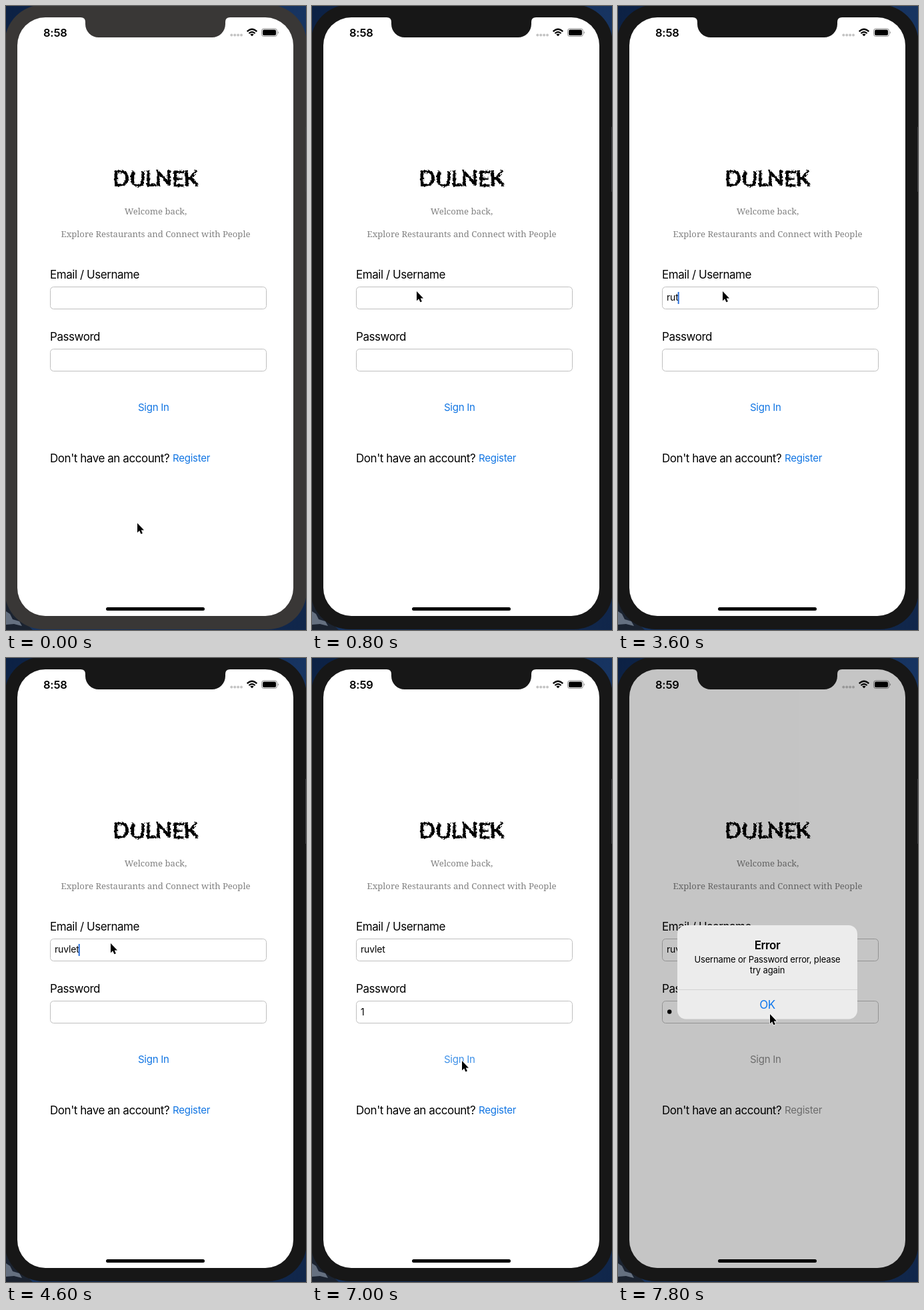
An HTML page that plays this animation: 450 px wide and 934 px high, repeating every 8 s.

```html
<!DOCTYPE html>
<html lang="en">
<head>
<meta charset="utf-8">
<title>Sign in</title>
<style>
html, body { margin: 0; width: 100%; height: 100%; overflow: hidden; background: #10264a; }
svg { display: block; width: 450px; height: 934px; }
text { font: 17px Inter, sans-serif; letter-spacing: -.45px; fill: #000; white-space: pre; }
.mid { text-anchor: middle; }
.clock { font-size: 16.5px; font-weight: 600; letter-spacing: -.2px; }
.logo { font: 700 33px Lato, sans-serif; letter-spacing: -1px; }
.tag { font: 13.1px "Noto Serif", serif; letter-spacing: 0; fill: #808080; }
.field { fill: #fff; stroke: #bfbfbf; }
.entry { font-size: 14px; letter-spacing: -.15px; }
.link { font-size: 15px; letter-spacing: -.25px; fill: #1175e3; }
.note { font-size: 13px; letter-spacing: -.15px; }
.bold { font-weight: 600; }
.ok { fill: #0f78ee; }

.bezel, #cursor, .link, .dim, #alert { animation: 8s step-end infinite; }
.bezel { fill: #171717; animation-name: activate; }
#cursor { animation-name: travel; }
.link { animation-name: fade; }
#sign { animation-name: press; }
.dim { animation-name: darken; }
#alert { transform-origin: 224px 470.5px; animation-name: pop; }

@keyframes activate { 0% { fill: #393736; } 7.5%, 100% { fill: #171717; } }
@keyframes travel {
  0% { transform: translate(197px, 774px); }
  2.5% { transform: translate(193px, 735px); }
  5% { transform: translate(172px, 530px); }
  7.5% { transform: translate(158px, 434px); }
  10% { transform: translate(157px, 427px); }
  60% { transform: translate(155px, 446px); }
  62.5% { transform: translate(149px, 505px); }
  65%, 72.5% { transform: translate(146px, 540px); }
  75% { transform: translate(153px, 547px); }
  77.5% { transform: translate(178px, 567px); }
  80% { transform: translate(208px, 592px); }
  82.5% { transform: translate(223px, 602px); }
  85%, 90% { transform: translate(225px, 603px); }
  92.5% { transform: translate(226px, 578px); }
  95% { transform: translate(228px, 541px); }
  97.5%, 100% { transform: translate(228px, 533px); }
}
@keyframes fade {
  0% { fill: #1175e3; }
  90% { fill: #748699; }
  92.5%, 100% { fill: #8c8c8c; }
}
@keyframes press {
  0% { fill: #1175e3; }
  87.5% { fill: #3f91e8; }
  90% { fill: #748699; }
  92.5%, 100% { fill: #8c8c8c; }
}
@keyframes darken { 0% { opacity: 0; } 90% { opacity: .204; } 92.5%, 100% { opacity: .231; } }
@keyframes pop {
  0% { opacity: 0; transform: scale(1.2); }
  90% { opacity: .84; transform: scale(1.03); }
  92.5%, 100% { opacity: 1; transform: none; }
}
</style>
</head>
<body>
<svg viewBox="0 0 450 934">
  <defs>
    <linearGradient id="sky" x2="1" y2="1">
      <stop offset="0" stop-color="#0c2144"/>
      <stop offset=".5" stop-color="#173461"/>
      <stop offset="1" stop-color="#10264a"/>
    </linearGradient>
    <filter id="rough" x="-5%" y="-20%" width="110%" height="140%">
      <feTurbulence type="fractalNoise" baseFrequency=".28" numOctaves="2" seed="4"/>
      <feDisplacementMap in="SourceGraphic" scale="5" xChannelSelector="R" yChannelSelector="G"/>
    </filter>
  </defs>

  <rect width="450" height="934" fill="url(#sky)"/>
  <path d="M0 884L8 896 24 918 40 934H0Z" fill="#1b2330"/>
  <path d="M0 906l6 4 4 8 10 3 4 7-12-3-12 1z" fill="#657080"/>
  <rect class="bezel" x="-2" y="-2" width="453" height="935" rx="58"/>
  <path d="M449.5 181V278" stroke="#3c3c3e"/>
  <rect x="17" y="17" width="414" height="896" rx="42" fill="#fff"/>

  <text class="clock" x="56" y="45.5" id="clock">8:58</text>
  <g fill="#c4c4c4">
    <circle cx="338.3" cy="43.5" r="2"/><circle cx="343.2" cy="43.5" r="2"/>
    <circle cx="348.1" cy="43.5" r="2"/><circle cx="353" cy="43.5" r="2"/>
  </g>
  <g fill="none" stroke="#000" stroke-width="2.3">
    <path d="M361.7 38.2Q369 31.2 376.3 38.2M364.4 41Q369 36.7 373.6 41"/>
    <path d="M366.3 42.4Q369 40.4 371.7 42.4L369 45.2Z" fill="#000" stroke="none"/>
  </g>
  <rect x="383.5" y="34" width="23" height="11.5" rx="3.2" fill="none" stroke="#8a8a8a"/>
  <rect x="385" y="35.5" width="20" height="8.5" rx="2"/>
  <path d="M408 37.7q2.2 2 0 4z" fill="#8a8a8a"/>

  <text class="logo mid" x="224.5" y="270" rotate="-2 3 0 -3 2 -2" filter="url(#rough)">DULNEK</text>
  <text class="tag mid" x="224.5" y="312">Welcome back,</text>
  <text class="tag mid" x="224.5" y="346">Explore Restaurants and Connect with People</text>

  <text x="66" y="408">Email / Username</text>
  <rect class="field" x="66.5" y="420.5" width="324" height="33" rx="5"/>
  <text class="entry" x="73" y="441" id="user"></text>
  <text x="66" y="501">Password</text>
  <rect class="field" x="66.5" y="513.5" width="324" height="33" rx="5"/>
  <text class="entry" x="73" y="534.5" id="pass"></text>
  <circle id="dot" cx="77.2" cy="529.5" r="3.2"/>
  <rect id="caret" width="2" height="18" fill="#2d72dc"/>

  <text class="link" id="sign" x="198" y="606">Sign In</text>
  <text x="66" y="683">Don't have an account?</text>
  <text class="link" x="250" y="682">Register</text>

  <rect class="dim" x="17" y="17" width="414" height="896" rx="42"/>
  <path class="bezel" d="M112 16V17q7 0 7 7v3a20 20 0 0 0 20 20h170a20 20 0 0 0 20-20v-3q0-7 7-7V16Z"/>
  <rect x="150" y="900" width="148" height="5" rx="2.5"/>

  <g id="alert">
    <rect x="89" y="400" width="270" height="140.5" rx="13" fill="#ececec"/>
    <path d="M89 496.5H359" stroke="#d2d2d2"/>
    <text class="mid bold" x="224" y="436">Error</text>
    <text class="note mid" x="224" y="456">Username or Password error, please</text>
    <text class="note mid" x="224" y="472">try again</text>
    <text class="ok mid" x="224" y="525">OK</text>
  </g>

  <g id="cursor">
    <path d="M0 0V14.2L3.2 11.3 5.4 16.3 7.9 15.2 5.7 10.4H10Z" stroke="#fff" stroke-width="1.6"
      stroke-linejoin="round" paint-order="stroke"/>
  </g>
</svg>
<script>
const $ = id => document.getElementById(id);
const LOOP = 8000;

// Each track lists [start ms, value].
const userTrack = [[0, ""], [1600, "r"], [1800, "ru"], [2000, "rut"], [2200, "rutv"], [3600, "rut"],
  [3800, "ru"], [4000, "ruv"], [4200, "ruvl"], [4400, "ruvle"], [4600, "ruvlet"]];
const passTrack = [[0, ""], [5800, "1"], [7200, ""]];
const caretTrack = [[0, ""], [1200, "user"], [2600, ""], [3000, "user"], [5200, ""],
  [5600, "pass"], [6400, ""], [6800, "pass"], [7000, ""]];
const clockTrack = [[0, "8:58"], [4800, "8:59"]];

const at = (track, t) => track.findLast(([start]) => start <= t)[1];
const show = (node, on) => node.setAttribute("visibility", on ? "visible" : "hidden");

function draw(t) {
  $("user").textContent = at(userTrack, t);
  $("pass").textContent = at(passTrack, t);
  $("clock").textContent = at(clockTrack, t);
  show($("dot"), t >= 7200);

  const focus = at(caretTrack, t);
  show($("caret"), focus);
  if (focus) {
    const entry = $(focus);
    const width = entry.textContent ? entry.getComputedTextLength() : 0;
    $("caret").setAttribute("x", 73 + width - (width ? 1 : 0));
    $("caret").setAttribute("y", focus === "user" ? 428 : 521);
  }
}

let origin;
function tick(now) {
  origin ??= now;
  draw((now - origin) % LOOP);
  requestAnimationFrame(tick);
}
draw(0);
requestAnimationFrame(tick);
</script>
</body>
</html>
```
